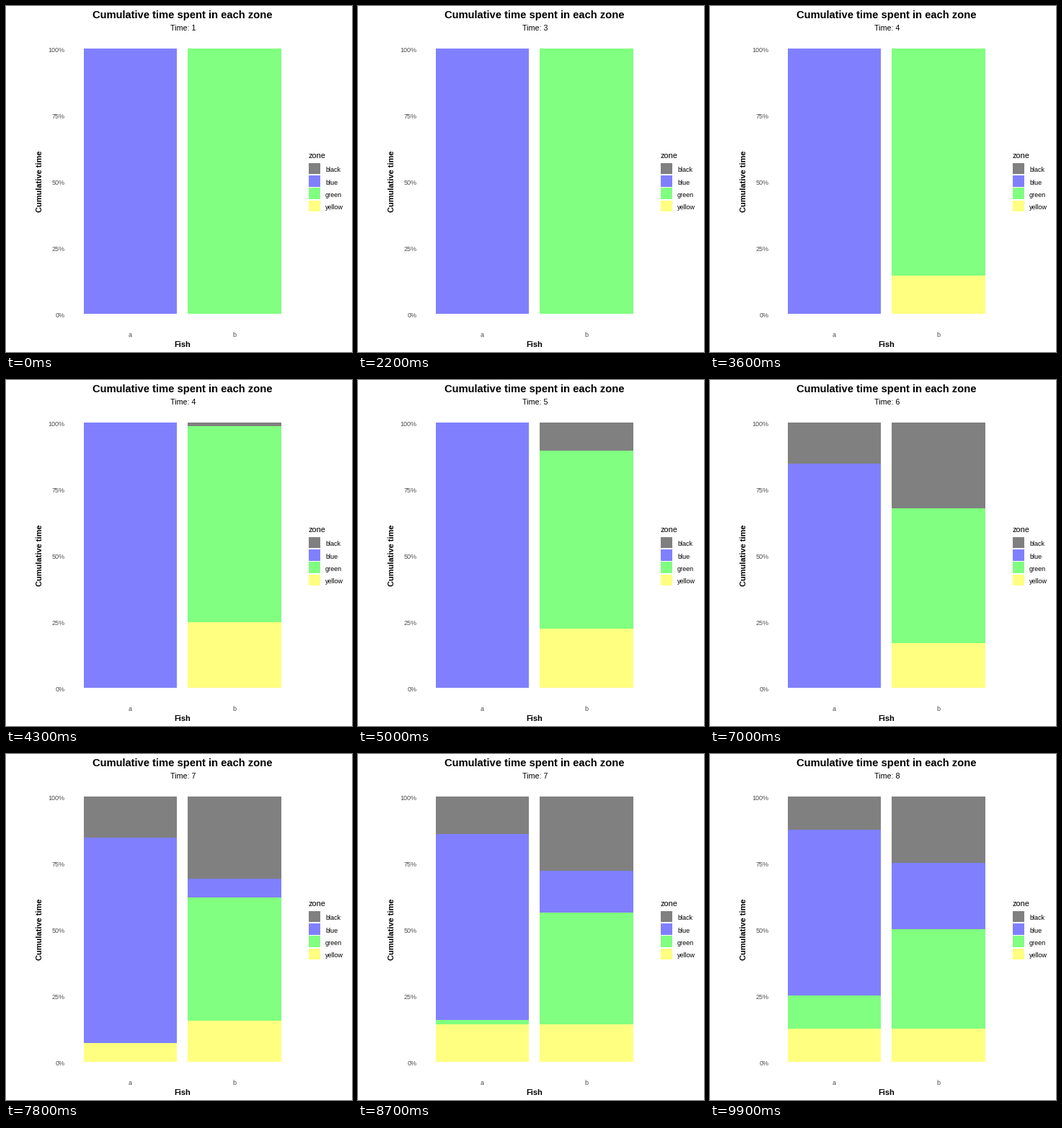
Recreate the animation shown at these times as a matplotlib script. Size 480 by 480 pixels, loop 10000 ms.

```python
import matplotlib.pyplot as plt
import numpy as np
from matplotlib.animation import FuncAnimation
from matplotlib.patches import Rectangle

SIZE, DPI = 480, 100
FRAMES, INTERVAL = 100, 100
TOP, BOTTOM = 59, 427

COLORS = {"yellow": "#ffff80", "green": "#80ff80", "blue": "#8080ff", "black": "#808080"}
ZONES = list(COLORS)  # stacked from the bottom up

# Zone each fish visits at every time step
VISITS = {
    "a": ["blue"] * 5 + ["black", "yellow", "green"],
    "b": ["green"] * 3 + ["yellow"] + ["black"] * 2 + ["blue"] * 2,
}
SPANS = {"a": (108, 237), "b": (252, 382)}
STEPS = 8
KEYS = np.round(np.linspace(0, FRAMES - 1, STEPS))

plt.rcParams["font.family"] = "Liberation Sans"
fig = plt.figure(figsize=(SIZE / DPI, SIZE / DPI), dpi=DPI, facecolor="white")
ax = fig.add_axes([0, 0, 1, 1])
ax.set_xlim(0, SIZE)
ax.set_ylim(SIZE, 0)
ax.axis("off")


def label(x, y, text, px, ha="center", **style):
    return ax.text(x, y, text, fontsize=px * 72 / DPI, ha=ha, va="baseline", **style)


def box(x0, x1, y0, y1, zone):
    rect = Rectangle((x0, y0), x1 - x0, y1 - y0, facecolor=COLORS[zone],
                     linewidth=0, antialiased=False)
    return ax.add_patch(rect)


def stack_tops(visits):
    """Cumulative share at the top of each zone, one row per time step."""
    hits = np.array([[v == z for z in ZONES] for v in visits], float)
    share = hits.cumsum(axis=0) / np.arange(1, STEPS + 1)[:, None]
    return share.cumsum(axis=1)


label(245, 17, "Cumulative time spent in each zone", 14.75, weight="bold")
subtitle = label(227.5, 34, "", 10.6, ha="left")

for i in range(5):
    label(81.5, 64 + 92 * i, f"{100 - 25 * i}%", 9, ha="right", color="#4d4d4d")
for name, x in (("a", 172.5), ("b", 316.5)):
    label(x, 459, name, 9, color="#4d4d4d")
label(244.5, 473, "Fish", 11, weight="bold")
label(50, 243, "Cumulative time", 11, weight="bold", rotation=90, rotation_mode="anchor")

label(420, 211, "zone", 11, ha="left")
legend_rows = [(218, 233, 230), (235, 251, 248), (252, 268, 265), (270, 285, 282)]
for zone, (y0, y1, base) in zip(reversed(ZONES), legend_rows):
    box(420, 436, y0, y1, zone)
    label(443, base, zone, 9, ha="left")

tops = {fish: stack_tops(visits) for fish, visits in VISITS.items()}
bars = {fish: [box(*SPANS[fish], BOTTOM, BOTTOM, z) for z in ZONES] for fish in VISITS}


def update(frame):
    time = 1 + (STEPS - 1) * frame / (FRAMES - 1)
    subtitle.set_text(f"Time: {round(time)}")
    for fish, rects in bars.items():
        lower = BOTTOM
        for rect, column in zip(rects, tops[fish].T):
            share = np.interp(frame, KEYS, column)
            upper = round(BOTTOM - (BOTTOM - TOP) * share)
            rect.set_y(upper)
            rect.set_height(lower - upper)
            rect.set_visible(lower > upper)
            lower = upper
    return [subtitle, *bars["a"], *bars["b"]]


anim = FuncAnimation(fig, update, frames=FRAMES, interval=INTERVAL, repeat=True,
                     repeat_delay=0, blit=False)
plt.show()
```
